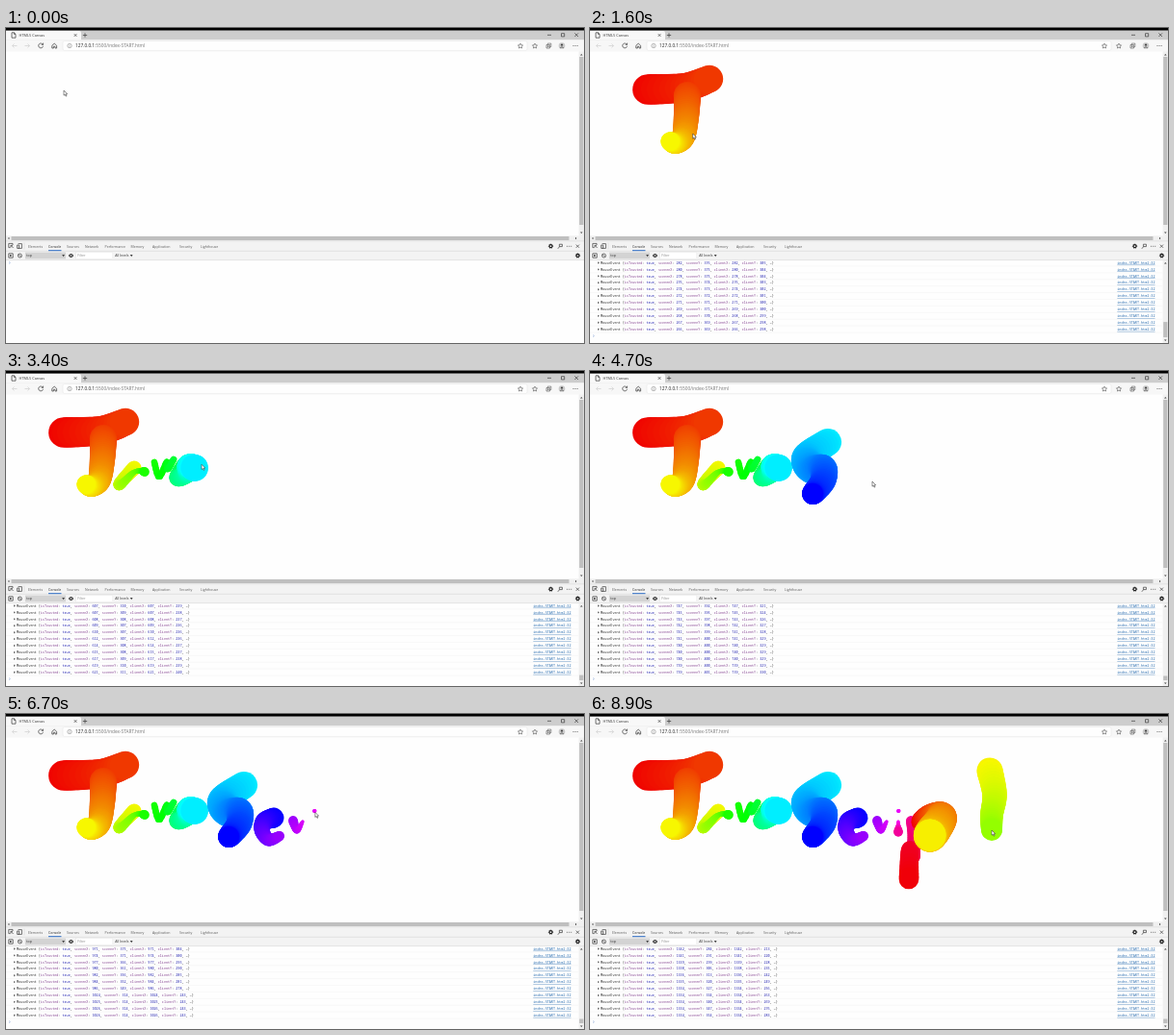
Write an HTML page that moves like this. It is 600x328 px and loops after 9 s.

```html
<!DOCTYPE html>
<html lang="en">
<head>
<meta charset="utf-8">
<title>HTML5 Canvas</title>
<style>
  html, body { margin: 0; width: 100%; height: 100%; overflow: hidden; background: #fefefe; }
  svg { display: block; width: 100vw; height: 100vh; }
  text { font-family: "Open Sans", "Noto Sans", sans-serif; white-space: pre; }
  .tabs text { font-size: 3.55px; fill: #5c5c5c; }
  .log text { font: 3.45px "Noto Sans Mono", "DejaVu Sans Mono", monospace; fill: #333; }
  .log .key { fill: #83408f; }
  .log .val { fill: #2323b0; }
  .log .link { fill: #2268ad; text-decoration: underline; }
  .icon { fill: none; stroke: #444; stroke-width: .75; }
  .solid { fill: #444; }
</style>
</head>
<body>
<svg viewBox="0 0 600 328">
  <rect width="600" height="328" fill="#fefefe"/>

  <!-- window and address bar -->
  <rect width="600" height="12.5" fill="#cdcdcd"/>
  <rect width="600" height="2.5" fill="#000"/>
  <path d="M0 12.5V3H76q2 0 2 2V12.5z" fill="#f8f8f8"/>
  <path class="icon" d="M6 4.8h2.4l1.6 1.6v3.8H6zM8.4 4.8v1.6H10"/>
  <text x="13.6" y="8.8" font-size="3.85" fill="#333">HTML5 Canvas</text>
  <path class="icon" d="M70.8 6.2l2.6 2.6m0-2.6l-2.6 2.6M79.8 7.5h4.4M82 5.3v4.4M562 7.3h4M576.5 5.7h3.2v3.2h-3.2zM590.4 5.4l3.6 3.6m0-3.6l-3.6 3.6"/>
  <rect y="12.5" width="600" height="12" fill="#f7f7f7"/>
  <rect x="59" y="13.6" width="482" height="9.8" rx="1.5" fill="#fefefe" stroke="#e2e2e2" stroke-width=".5"/>
  <path class="icon" style="stroke:#d2d2d2" d="M11.5 18.5h-5m2-2l-2 2 2 2M19.5 18.5h5m-2-2l2 2-2 2"/>
  <path class="icon" d="M38.2 17.2a2.4 2.4 0 1 0 .3 1.6M38.6 15.6v1.8h-1.8M47.8 18.3l2.4-2.2 2.4 2.2v2.7h-1.6v-1.8h-1.6v1.8h-1.6z"/>
  <g class="icon" style="stroke:#777;stroke-width:.5"><circle cx="66" cy="18.5" r="2.2"/><path d="M66 18v1.8m0-2.8v.5"/></g>
  <text x="72" y="20.2" font-size="4.75" fill="#777"><tspan fill="#222">127.0.0.1</tspan>:5500/index-START.html</text>
  <path class="icon" style="stroke-width:.55" d="M534 16l.8 1.7 1.8.2-1.3 1.3.3 1.8-1.6-.9-1.6.9.3-1.8-1.3-1.3 1.8-.2zM549 16l.8 1.7 1.8.2-1.3 1.3.3 1.8-1.6-.9-1.6.9.3-1.8-1.3-1.3 1.8-.2zM561 17.5h3.5V21H561zM562.3 17.3v-1.2h3.5v3.5h-1.2M562.8 18.2v2m-1-1h2"/>
  <circle cx="577" cy="18.5" r="3.3" fill="#c9c9c9"/>
  <path class="icon" d="M575.2 20.8q1.8-2.2 3.6 0"/><circle class="solid" cx="577" cy="17.6" r="1.1"/>
  <path class="icon" stroke-dasharray="1 1.1" d="M588.5 18.5h5.4"/>

  <!-- page scrollbars -->
  <rect x="594.6" y="24.5" width="5.4" height="192" fill="#f0f0f0"/>
  <rect x="595.2" y="30" width="4.2" height="175" fill="#bfbfbf"/>
  <rect y="216.4" width="600" height="5.2" fill="#f0f0f0"/>
  <rect x="5.5" y="217" width="579" height="4" fill="#bfbfbf"/>
  <path class="solid" d="M596 28.5h2.6l-1.3-1.6zM596 212.5h2.6l-1.3 1.6zM3.4 217.8v2.4L2 219zM591 217.8v2.4l1.4-1.2z"/>

  <!-- developer tools -->
  <g class="tabs">
    <rect y="221.6" width="600" height="20" fill="#f3f3f3"/>
    <path d="M0 221.8H600M0 232.3H600M0 241.6H600M18.8 223.5v7" stroke="#cfcfcf" stroke-width=".5"/>
    <path d="M44 231.7H57.5" stroke="#2b6cc4" stroke-width="1"/>
    <g id="tabs"></g>
    <path class="icon" d="M7 226v-1.6H2.8v4.2h1.8M5 226.4l2.6 2.6m-2.6-.7v-1.9h1.9M12.6 224.6h3.8v4.8h-3.8M11.6 226h2v3.4h-2z"/>
    <path class="icon" d="M572.8 229.8l2-2.4m-.4-2.2h3v2.4h-3z"/>
    <path class="icon" d="M591.8 225.6l3.2 3.2m0-3.2l-3.2 3.2"/>
    <path class="icon" stroke-dasharray="1 1.1" d="M582 227.3h5.4"/>
    <g class="icon" style="stroke-width:1.3;stroke:#222"><circle cx="565.5" cy="227.2" r="1.5"/><circle cx="593.5" cy="237" r="1.5"/></g>
    <g class="icon" style="stroke-width:.8;stroke:#222" stroke-dasharray=".8 1.05"><circle cx="565.5" cy="227.2" r="2.2"/><circle cx="593.5" cy="237" r="2.2"/></g>
    <path class="icon" d="M2.8 234.8h4.4v4.4H2.8z"/><path class="solid" d="M4 235.7l2.4 1.3-2.4 1.3z"/>
    <circle class="icon" cx="14.4" cy="237" r="2"/><path class="icon" d="M13 235.6l2.8 2.8"/>
    <rect x="20" y="233.6" width="42" height="6.8" fill="#d3d3d3"/>
    <text x="21.3" y="238.3" style="fill:#333">top</text>
    <path class="solid" d="M58.2 236h2.8l-1.4 2.2zM128.8 236h2.8l-1.4 2.2z"/>
    <path d="M64.8 237q2.7-4 5.4 0-2.7 4-5.4 0z" fill="#333"/><circle cx="67.5" cy="237" r="1" fill="#f3f3f3"/><circle cx="67.5" cy="237" r=".55" fill="#333"/>
    <rect x="72.8" y="233.6" width="38" height="6.8" fill="#fff" stroke="#ddd" stroke-width=".3"/>
    <text x="74.2" y="238.3" style="fill:#8a8a8a">Filter</text>
    <text x="113.2" y="238.3" style="fill:#333">All levels</text>
  </g>

  <g class="log" id="log"></g>
  <path id="prompt" class="icon" style="stroke:#8aa6d6;stroke-width:.6" d="M3 -1.1l1.4 1.1-1.4 1.1"/>
  <g id="scroll">
    <rect x="594.6" y="242" width="5.4" height="86" fill="#f0f0f0"/>
    <rect id="thumb" x="595.2" width="4.2" fill="#bfbfbf"/>
    <path class="solid" d="M596 245.5h2.6l-1.3-1.6zM596 324.5h2.6l-1.3 1.6z"/>
  </g>

  <g id="paint" stroke-linecap="round"></g>
  <path id="cursor" d="M0 0V5.2l1.2-1.1.9 2 .9-.4-.9-1.9H3.7z" fill="#fff" stroke="#333" stroke-width=".55"/>
</svg>

<script>
const LOOP = 9000, STEP = 100, ROWS = 11, PITCH = 6.92, TOP = 244.5, LOG_DELAY = 80;
const $ = id => document.getElementById(id);

function add(parent, name, attrs) {
  const el = document.createElementNS("http://www.w3.org/2000/svg", name);
  for (const key in attrs) el.setAttribute(key, attrs[key]);
  return parent.appendChild(el);
}

// start ms, final hue, mouse path, extra width gained along the stroke
const strokes = [
  [250, 14, "60,64 98,62 124,53"],
  [850, 60, "101,70 100,92 97,113 89,120 83,118", 4],
  [1900, 114, "133,101 118,117 121,117 132,106 139,104 144,105", 3],
  [2500, 132, "154,95 159,110 167,95 168,102 174,92", -6],
  [2850, 184, "184,97 178,111 188,106 190,99 196,101"],
  [3650, 240, "247,74 225,90 231,102 242,102 242,114 233,126 231,128"],
  [4450, 240, "293,115"],
  [5000, 276, "278,108 268,112 266,122 273,131 284,127"],
  [5800, 292, "298,111 302,121 308,112", -1],
  [6400, 298, "320,101 321,101"],
  [6850, 322, "320,112 320,123"],
  [7200, 358, "333,111 336,128 335,148 332,142 331,172"],
  [7850, 418, "344,112 354,107 365,108 354,125 353,126", 5],
  [8500, 445, "415,59 420,84 417,105 417,121", 2]
];

// Catmull-Rom position at u in 0..1
function along(points, u) {
  const last = points.length - 1;
  const i = Math.min(Math.floor(u * last), Math.max(last - 1, 0)), f = u * last - i;
  const at = k => points[Math.max(0, Math.min(last, k))];
  return [0, 1].map(axis => {
    const [a, b, c, d] = [-1, 0, 1, 2].map(k => at(i + k)[axis]);
    return b + f / 2 * (c - a + f * (2 * a - 5 * b + 4 * c - d + f * (3 * (b - c) + d - a)));
  });
}

// the brush shrinks and grows as the hue advances; reds are a little darker
const brush = hue => 32 * Math.max(.05, Math.abs(100 - hue % 200) / 100) ** .8;
const color = hue => `hsl(${hue % 360},100%,${50 - 3 * Math.max(0, Math.cos(hue * Math.PI / 180))}%)`;

const track = [{ t: 0, x: 60, y: 65 }], events = [];
let hue = 0;
for (const [start, lastHue, path, swell = 0] of strokes) {
  const points = path.split(" ").map(p => p.split(",").map(Number));
  const count = lastHue - hue, duration = 250 + 5 * count;
  let [px, py] = points[0];
  track.push({ t: start, x: px, y: py });
  for (let n = 1; n <= count; n++) {
    const u = n / count, [x, y] = along(points, u), t = start + duration * u;
    hue++;
    const line = add($("paint"), "line", {
      x1: px, y1: py, x2: x, y2: y,
      stroke: color(hue),
      "stroke-width": brush(hue) + swell * u
    });
    const event = { t, x, y, line };
    events.push(event);
    track.push(event);
    [px, py] = [x, y];
  }
  if (!count) track.push({ t: start + duration, x: px, y: py });
}

const tabNames = { Elements: 23, Console: 44, Sources: 63, Network: 82, Performance: 102.5,
  Memory: 129.5, Application: 152, Security: 180, Lighthouse: 202 };
for (const name in tabNames) {
  const tab = add($("tabs"), "text", { x: tabNames[name], y: 228.5 });
  tab.textContent = name;
  if (name === "Console") tab.style.fill = "#222";
}

const rows = Array.from({ length: ROWS }, (_, i) => {
  const g = add($("log"), "g", { transform: `translate(0 ${TOP + i * PITCH})` });
  add(g, "path", { d: "M0 3.4H594", stroke: "#ececec", "stroke-width": .4 });
  add(g, "path", { d: "M8 -1.2l1.9 1.2-1.9 1.2z", fill: "#666" });
  const text = add(g, "text", { x: 11, y: 1.2, "font-style": "italic" });
  const link = add(g, "text", { x: 586.5, y: 1.2, "text-anchor": "end", class: "link" });
  link.textContent = "index-START.html:32";
  return { g, text };
});

const pair = (key, value) => `<tspan class="key">${key}</tspan>: <tspan class="val">${value}</tspan>, `;

function describe({ x, y }) {
  const cx = Math.round(x * 3.2), cy = Math.round((y - 25) * 3.2);
  return "MouseEvent {" + pair("isTrusted", true) + pair("screenX", cx) +
    pair("screenY", cy + 71) + pair("clientX", cx) + pair("clientY", cy) + "…}";
}

function drawLog(t) {
  const count = events.filter(e => e.t <= t - LOG_DELAY).length;
  const first = Math.max(0, count - ROWS), shown = count - first;
  rows.forEach(({ g, text }, i) => {
    g.style.display = i < shown ? "" : "none";
    if (i < shown) text.innerHTML = describe(events[first + i]);
  });
  $("prompt").setAttribute("transform", `translate(0 ${TOP + shown * PITCH})`);
  $("scroll").style.display = count > ROWS ? "" : "none";
  const height = Math.max(4.5, 78 * 86 / ((count + 1) * PITCH));
  $("thumb").setAttribute("height", height);
  $("thumb").setAttribute("y", 322 - height);
}

function drawCursor(t) {
  const next = track.findIndex(p => p.t > t);
  const b = track[next < 0 ? track.length - 1 : next];
  const a = next < 0 ? b : track[next - 1];
  const f = b.t > a.t ? (t - a.t) / (b.t - a.t) : 0;
  const x = a.x + (b.x - a.x) * f, y = a.y + (b.y - a.y) * f;
  $("cursor").setAttribute("transform", `translate(${x} ${y})`);
}

function draw(t) {
  for (const e of events) e.line.style.display = e.t <= t ? "" : "none";
  drawLog(t);
  drawCursor(t);
}

const begin = performance.now();
let shownTime = -1;
function tick() {
  const t = Math.floor((performance.now() - begin) % LOOP / STEP) * STEP;
  if (t !== shownTime) draw(shownTime = t);
  requestAnimationFrame(tick);
}
tick();
</script>
</body>
</html>
```
